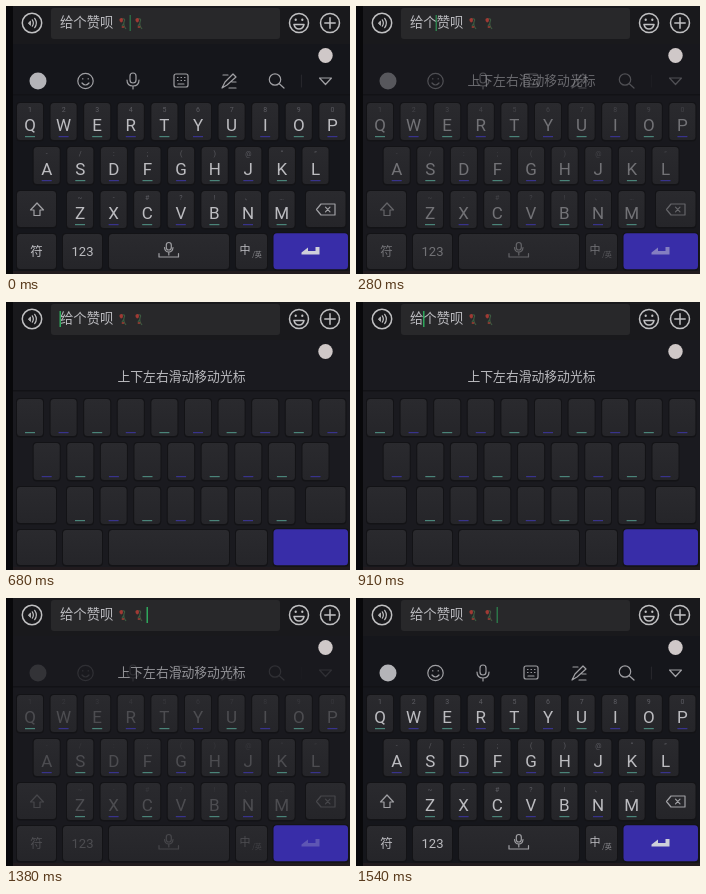
Write an HTML page that moves like this. It is 344x268 px and loops after 1620 ms.

```html
<!DOCTYPE html>
<html lang="zh">
<head>
<meta charset="utf-8">
<style>
  html, body { margin: 0; height: 100%; overflow: hidden; background: #08080a; }
  svg { display: block; width: 100vw; height: 100vh; }
  text { font-family: "Noto Sans CJK SC", "Noto Sans CJK", sans-serif; text-anchor: middle; fill: #bcbcc0; }
  .latin { font-family: Roboto, Inter, sans-serif; }
  .alt { font-size: 7px; fill: #5c5c62; }
  .icon { fill: none; stroke: #a0a0a4; stroke-width: 1.2; stroke-linecap: round; stroke-linejoin: round; }
  .top { stroke: #c0c0c2; stroke-width: 1.5; }
</style>
</head>
<body>
<svg viewBox="0 0 344 268">
  <defs>
    <linearGradient id="keyFill" x2="0" y2="1">
      <stop stop-color="#2a2a2e"/><stop offset="1" stop-color="#252529"/>
    </linearGradient>
    <g id="rose">
      <path d="M-1-4Q3-5 1-1Q0 2 3 6M1 0L-1 3" fill="none" stroke="#3c5a40" stroke-width="1.2"/>
      <path d="M-3.5-4Q-1-6 0-3.5Q0-.5-2-.5Q-4-1.5-3.5-4Z" fill="#a03a34"/>
      <ellipse cy="4" rx="1.5" ry="1.1" fill="#8f3d33"/>
    </g>
  </defs>

  <path d="M7 0H344V38H7Z" fill="#19191c"/>
  <path id="board" d="M7 38H344V265H7Z"/>
  <path d="M7 88H344V89.5H7Z" fill="#121216"/>
  <path d="M7 265H344V268H7Z" fill="#211b1e"/>
  <rect x="45" y="2" width="229" height="31" rx="3" fill="#28282a"/>
  <text x="80.7" y="21.4" font-size="13.4">给个赞呗</text>
  <use href="#rose" x="117" y="17"/>
  <use href="#rose" x="133" y="17"/>
  <rect id="caret" y="9" width="1.5" height="16" fill="#2fa75c"/>

  <g class="icon top">
    <circle cx="26" cy="17" r="9.7"/>
    <path d="M22.5 17L24.5 15V19Z" fill="#c0c0c2" stroke-width=".8"/>
    <path d="M26.3 13.8Q28.4 17 26.3 20.2M28.7 12.3Q32 17 28.7 21.7" stroke-width="1.2"/>
    <circle cx="293" cy="17" r="9.5"/>
    <path d="M288 18.5H298Q297 23 293 23Q289 23 288 18.5Z"/>
    <path d="M289.7 13.5v.4M296.3 13.5v.4" stroke-width="2.2"/>
    <circle cx="324" cy="17" r="9.5"/>
    <path d="M318.8 17H329.2M324 11.8V22.2"/>
  </g>
  <ellipse cx="319.5" cy="49.5" rx="7.2" ry="7.5" fill="#cfc8c8"/>

  <g id="keys"></g>
  <g id="tools" class="icon">
    <circle cx="32" cy="75" r="8.5" fill="#b4b4b8" stroke="none"/>
    <circle cx="79.5" cy="75" r="7.7"/>
    <path d="M76 77Q79.5 81 83 77M76.8 72.5v.5M82.2 72.5v.5"/>
    <rect x="124" y="67" width="6" height="10" rx="3"/>
    <path d="M121 74Q121 80 127 80Q133 80 133 74M127 80V83"/>
    <rect x="168" y="68" width="14" height="13" rx="2"/>
    <path d="M171.5 71.5h.5M175 71.5h.5M178.5 71.5h.5M171.5 74.5h.5M175 74.5h.5M178.5 74.5h.5M172 78H178"/>
    <path d="M217 69H222M216 82L219 76L227 68L230 71L221 79ZM223 82H230M226 76H230"/>
    <circle cx="269" cy="73.5" r="5.7"/>
    <path d="M273.3 77.8L278 82M313.5 72H325.5L319.5 78.5Z"/>
    <path d="M295.5 69V81" stroke="#26262b"/>
  </g>
  <g id="labels">
    <g class="icon">
      <path d="M31 197L24.5 204H28V209.5H34V204H37.5Z"/>
      <path d="M310.5 203.5L315 198H329V209H315ZM319.5 201.2L324 205.8M324 201.2L319.5 205.8"/>
      <rect x="160.3" y="236.5" width="5" height="7.5" rx="2.5"/>
      <path d="M158.5 241.5Q159 246 162.8 246Q166.6 246 167 241.5M162.8 246V249M153 247.5V251H172.5V247.5"/>
    </g>
    <text x="30.5" y="249.5" font-size="12.5">符</text>
    <text x="76.5" y="249.5" font-size="13" class="latin">123</text>
    <text x="239" y="248" font-size="11">中</text>
    <text x="251" y="250.5" font-size="7" fill-opacity=".7">/英</text>
    <path d="M295.5 246.5L302 241.5V245H309.5V241H313.5V248.5H295.5Z" fill="#cfcfda"/>
  </g>
  <text id="hint" x="175.5" y="79.2" font-size="12.8" font-weight="500">上下左右滑动移动光标</text>
</svg>
<script>
const $ = id => document.getElementById(id);
const pitch = 33.6;

function add(parent, tag, attrs, content = '') {
  const el = document.createElementNS('http://www.w3.org/2000/svg', tag);
  for (const name in attrs) el.setAttribute(name, attrs[name]);
  el.textContent = content;
  $(parent).append(el);
}

function key(x, y, width, height, fill = 'url(#keyFill)') {
  add('keys', 'rect', { x: x - 1, y: y - 1, width: width + 2, height: height + 2.5, rx: 4, fill: '#131316' });
  add('keys', 'rect', { x, y, width, height, rx: 3.5, fill });
}

const rows = [
  { x: 24, y: 97, letters: 'QWERTYUIOP', alts: '1234567890', green: 0 },
  { x: 40.7, y: 141, letters: 'ASDFGHJKL', alts: '-/:;()@“”', green: 1 },
  { x: 74, y: 185, letters: 'ZXCVBNM', alts: '~-#?!、…', green: 0 }
];
for (const { x, y, letters, alts, green } of rows) {
  [...letters].forEach((letter, i) => {
    const cx = x + i * pitch;
    key(cx - 13, y, 26, 37);
    add('keys', 'rect', {
      x: cx - 5, y: y + 33, width: 10, height: 1.2,
      fill: i % 2 == green ? '#4a8479' : '#38338c'
    });
    add('labels', 'text', { x: cx, y: y + 27.5, 'font-size': 17, class: 'latin' }, letter);
    add('labels', 'text', { x: cx, y: y + 8.7, class: 'latin alt' }, alts[i]);
  });
}
key(11, 185, 39, 36);
key(300, 185, 39.5, 36);
for (const [x, width] of [[11, 39], [57, 39], [103, 120], [230, 31]]) key(x, 228, width, 35);
key(267.5, 227.3, 74.5, 36, '#382da8');

// [start in ms, caret x, keyboard label visibility, caret opacity]
const steps = [
  [0, 123.5, 1, .5], [70, 123.5, 1, 1], [210, 93.5, .8, 1], [280, 79.5, .5, .7],
  [360, 66.5, .25, 1], [440, 53.5, .08, 1], [520, 53.5, 0, 1], [910, 67, 0, 1],
  [990, 80, 0, 1], [1070, 107, 0, 1], [1220, 123.5, 0, 1], [1300, 140.5, .1, 1],
  [1380, 140.5, .25, 1], [1460, 140.5, .52, 1], [1540, 140.5, 1, .6]
];
const mix = (a, b, k) => a + (b - a) * k;

function draw() {
  const t = performance.now() % 1620;
  const [, x, shown, caretOpacity] = steps.findLast(step => step[0] <= t);
  $('caret').setAttribute('x', x);
  $('caret').setAttribute('opacity', caretOpacity);
  $('labels').setAttribute('opacity', shown);
  $('tools').setAttribute('opacity', shown ** 1.3);
  $('hint').setAttribute('opacity', 1 - shown);
  $('board').setAttribute('fill', `rgb(${mix(26, 21, shown)},${mix(26, 22, shown)},${mix(31, 27, shown)})`);
  requestAnimationFrame(draw);
}
draw();
</script>
</body>
</html>
```
